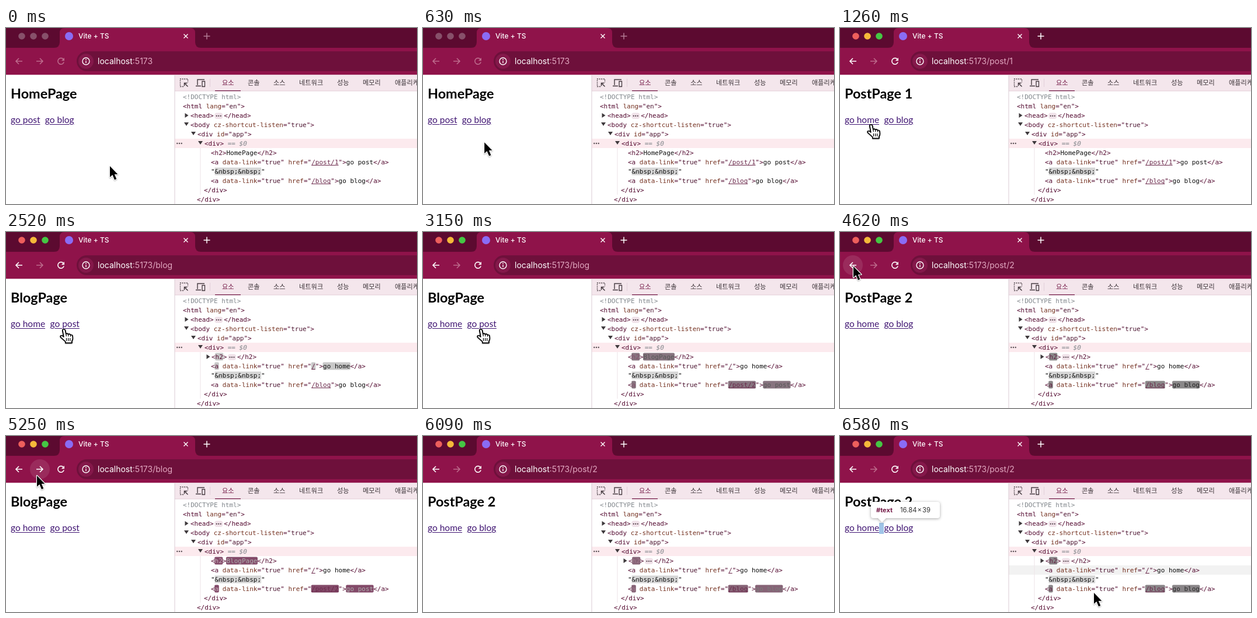
An HTML page with a canvas that plays this animation: 704x302 px, repeating every 6650 ms.

```html
<!DOCTYPE html>
<html lang="en">
<head>
<meta charset="utf-8">
<title>Router demo</title>
<style>
html, body { margin: 0; width: 100%; height: 100%; overflow: hidden; background: #fff; }
canvas { display: block; width: 704px; height: 302px; }
</style>
</head>
<body>
<canvas id="stage"></canvas>
<script>
const W = 704, H = 302, LOOP = 6650;
const canvas = document.getElementById('stage');
const ctx = canvas.getContext('2d');
const dpr = window.devicePixelRatio || 1;
canvas.width = W * dpr;
canvas.height = H * dpr;

const UI = 'Inter, Roboto, sans-serif';
const PAGE = 'Lato, "Open Sans", sans-serif';
const MONO = '"DejaVu Sans Mono", monospace';
const KOREAN = '"Noto Sans CJK KR", "Noto Sans CJK", sans-serif';

const STRIP = '#5c0a30', BAR = '#8f134a', PILL = '#6e103b', SOFT = '#e2a8c0', DIM = '#bd6b8c';
const TAG = [82, 8, 46], INK = [16, 16, 16], META = [138, 138, 138], WHITE = [255, 255, 255];
const FLASH = [126, 32, 84], LINK = [108, 42, 76], VALUE = [74, 18, 46];
const ATTR = '#74301f', GREY = '#80868b', ACCENT = '#741a47', VISITED = '#3f1472';
const rgb = (c, a = 1) => `rgba(${c.map(Math.round)},${a})`;
const mix = (a, b, k) => a.map((v, i) => v + (b[i] - v) * k);

const PAGES = {
  home: { title: 'HomePage', path: '', links: ['go post', 'go blog'] },
  post1: { title: 'PostPage 1', path: '/post/1', links: ['go home', 'go blog'] },
  blog: { title: 'BlogPage', path: '/blog', links: ['go home', 'go post'] },
  post2: { title: 'PostPage 2', path: '/post/2', links: ['go home', 'go blog'] }
};
const HREF = { 'go home': '/', 'go blog': '/blog' };

const visits = [[0, 'home'], [1190, 'post1'], [2520, 'blog'], [3570, 'post2'], [4970, 'blog'], [5670, 'post2']];
// Inspector updates follow each visit; the third item is the link that flashes.
const updates = [[-9999, 'home', -1], [1340, 'post1', 0], [2660, 'blog', 1],
  [3730, 'post2', 1], [5090, 'blog', 1], [5770, 'post2', 1]];
const path = [[0, 178, 236], [420, 178, 236], [800, 53, 166], [1890, 53, 166], [2400, 99, 167],
  [3500, 99, 167], [3780, 42, 68], [3990, 23, 58], [4990, 23, 58], [5200, 53, 67],
  [5950, 53, 67], [6300, 372, 192], [6580, 435, 268]];
const FOCUS = 840;

const latest = (list, t) => list.filter(e => e[0] <= t).pop();

function pointer(t) {
  const i = Math.max(1, path.findIndex(p => p[0] > t));
  if (t >= path[path.length - 1][0]) return path[path.length - 1].slice(1);
  const [a, b] = [path[i - 1], path[i]];
  const k = (t - a[0]) / (b[0] - a[0]);
  const e = k * k * (3 - 2 * k);
  return [a[1] + (b[1] - a[1]) * e, a[2] + (b[2] - a[2]) * e];
}

// cubic-bezier(0, 0, 0.2, 1)
function easeOut(x) {
  if (x <= 0) return 0;
  if (x >= 1) return 1;
  let lo = 0, hi = 1;
  for (let i = 0; i < 20; i++) {
    const m = (lo + hi) / 2;
    if (0.6 * m * m + 0.4 * m * m * m < x) lo = m; else hi = m;
  }
  return 3 * lo * lo - 2 * lo * lo * lo;
}

function rect(x, y, w, h, fill, r = 0) {
  ctx.fillStyle = fill;
  ctx.beginPath();
  ctx.roundRect(x, y, w, h, r);
  ctx.fill();
}

function disc(x, y, r, fill) {
  ctx.fillStyle = fill;
  ctx.beginPath();
  ctx.arc(x, y, r, 0, Math.PI * 2);
  ctx.fill();
}

function poly(points, fill) {
  ctx.fillStyle = fill;
  ctx.beginPath();
  points.forEach(p => ctx.lineTo(p[0], p[1]));
  ctx.closePath();
  ctx.fill();
}

function stroke(d, color, width = 1.5) {
  ctx.strokeStyle = color;
  ctx.lineWidth = width;
  ctx.stroke(new Path2D(d));
}

function text(s, x, y, font, color) {
  ctx.font = font;
  ctx.fillStyle = color;
  ctx.fillText(s, x, y);
  return x + ctx.measureText(s).width;
}

function drawBrowser(t, page, cursor) {
  const active = t >= FOCUS;
  const canForward = page.title === 'BlogPage' && t > 4000;
  rect(0, 0, W, 34, STRIP);
  rect(0, 34, W, 47, BAR);
  ctx.fillStyle = BAR;
  ctx.fill(new Path2D('M82 34Q92 34 92 24V8Q92 0 101 0H315Q324 0 324 8V24Q324 34 334 34Z'));
  ['#ed5f5c', '#f5b93a', '#45c744'].forEach((c, i) => disc(27 + i * 20, 14, 5.8, active ? c : '#87506a'));
  disc(108, 14, 7, '#8a6cf5');
  text('Vite + TS', 124, 18.3, '500 12px ' + UI, '#fff');
  stroke('M304.5 10.5l7 7m0-7l-7 7', '#fff', 1.4);
  stroke('M338.5 14h11m-5.5-5.5v11', active ? '#fff' : '#b47c95', 1.5);

  const [cx, cy] = cursor;
  if (cy < 74 && cy > 40) {
    if (cx < 39 && t > 3800 && t < 5200) disc(22, 57, 17, 'rgba(255,255,255,.1)');
    if (cx > 42 && t > 5000 && t < 5950) disc(58, 57, 17, 'rgba(255,255,255,.1)');
  }
  const live = active ? '#fff' : DIM;
  const canBack = page.title !== 'HomePage';
  stroke('M28 57H17m5-5l-5 5l5 5', canBack ? live : DIM, 1.6);
  stroke('M52 57H63m-5-5l5 5l-5 5', canForward ? live : DIM, 1.6);
  stroke('M98.6 54A5.3 5.3 0 1 0 99.2 58.6', live, 1.6);
  poly([[100, 51], [100, 56.2], [94.8, 56.2]], live);

  rect(121, 40, 620, 34, PILL, 17);
  disc(137, 57, 13, '#84184a');
  stroke('M143 57a6 6 0 1 1-12 0a6 6 0 1 1 12 0M137 56.2v4', '#fff', 1.4);
  disc(137, 54, 0.9, '#fff');
  const x = text('localhost', 157, 62, '14px ' + UI, '#fff');
  text(':5173' + page.path, x, 62, '14px ' + UI, SOFT);
}

function drawLink(s, x) {
  ctx.font = '15.5px ' + PAGE;
  const w = ctx.measureText(s).width;
  rect(x, 165, w, 1.1, VISITED);
  ctx.strokeStyle = '#fff';
  ctx.lineWidth = 2.4;
  ctx.strokeText(s, x, 163);
  text(s, x, 163, ctx.font, VISITED);
  return x + w;
}

function drawPage(page) {
  rect(0, 81, 289, 221, '#fff');
  rect(0, 80, W, 1, '#e3c3d1');
  text(page.title, 8, 121, 'bold 23.4px ' + PAGE, '#000');
  drawLink(page.links[1], drawLink(page.links[0], 8) + 8.4);
}

// Each token is [text, colour, mark, flash].
function code(x, y, tokens, age = 9999) {
  for (const [s, color, mark, flash] of tokens) {
    ctx.font = '11px ' + MONO;
    const w = ctx.measureText(s).width;
    let c = color;
    if (flash && age < 1400) {
      const bg = age < 1120
        ? rgb(mix(FLASH, META, easeOut(age / 1120)))
        : rgb(META, 1 - easeOut((age - 1120) / 280));
      rect(x - 0.5, y - 6.5, w + 1, 13, bg, 2);
      if (mark !== 'link') c = mix(WHITE, color, easeOut(age / 1400));
    }
    if (mark === 'entity') rect(x, y - 6.5, w, 13, '#d6d6d6');
    text(s, x, y + 3.8, (mark === 'italic' ? 'italic ' : '') + '11px ' + MONO, Array.isArray(c) ? rgb(c) : c);
    if (mark === 'link') rect(x, y + 5, w, 1, rgb(c));
    x += w;
  }
  return x;
}

const tag = s => [s, TAG];
const attr = (name, value) => [[' ' + name, ATTR], ['="', TAG], [value, VALUE], ['"', TAG]];

function caret(x, y, open) {
  poly(open ? [[x - 4, y - 4], [x + 4, y - 4], [x, y + 2]]
    : [[x - 2.5, y - 4], [x + 3.5, y], [x - 2.5, y + 4]], '#3f3a3d');
}

function dots(x, y, gap, r, color) {
  for (let i = -1; i < 2; i++) disc(x + i * gap, y, r, color);
}

function folded(x, y, name, flash, age) {
  const end = code(x, y, [tag('<'), [name, TAG, 'on', flash], tag('>')], age);
  rect(end + 1.5, y - 4.5, 14, 10.5, '#f0e2e9', 4);
  dots(end + 8.5, y + 0.8, 3.5, 1.1, '#4b3943');
  code(end + 17.5, y, [tag(`</${name}>`)]);
}

function anchor(y, label, flash, age) {
  code(351, y, [tag('<'), ['a', TAG, 'on', flash], ...attr('data-link', 'true'),
    [' href', ATTR], tag('="'), [HREF[label] || label.href, LINK, 'link', flash], tag('">'),
    [label.text || label, INK, 'on', flash], tag('</a>')], age);
}

function drawToolbar() {
  rect(289, 81, 415, 27, '#f4e6ec');
  rect(289, 107.5, 415, 1, '#e4cdd7');
  const icon = '#453b40';
  ctx.setLineDash([2, 1.6]);
  stroke('M304 100.5H298.5V87.5H311.5V93', icon, 1.3);
  ctx.setLineDash([]);
  stroke('M311.5 100.5l-6-6m0 5v-5h5', icon, 1.5);
  stroke('M328 98V88.5H340M325 99.5H334', icon, 1.4);
  stroke('M336 91.5h4.5v9h-4.5z', icon, 1.3);
  rect(349, 87, 1, 14, '#e3d0d9');
  const tabs = [['요소', 370], ['콘솔', 414], ['소스', 458], ['네트워크', 502],
    ['성능', 567], ['메모리', 611], ['애플리케이션', 666]];
  tabs.forEach(([s, x], i) => text(s, x, 98, '11.2px ' + KOREAN, i ? '#3d3439' : ACCENT));
  rect(358, 107, 44, 1.2, ACCENT);
}

function drawInspector(t) {
  const [since, name, changed] = latest(updates, t);
  const page = PAGES[name], age = t - since;
  rect(289, 81, 415, 221, '#fff');
  drawToolbar();
  rect(289, 190, 415, 16, '#fceaee');
  if (t >= 6440) rect(289, 222, 415, 16, '#f2f2f2');
  rect(288.5, 81, 1, 221, '#dccbd3');
  rect(332.5, 206, 1, 80, '#eee3e8');

  code(303, 118, [['<!DOCTYPE html>', GREY]]);
  code(303, 134, [tag('<html'), ...attr('lang', 'en'), tag('>')]);
  caret(309, 150, false);
  folded(316, 150, 'head');
  caret(309, 166, true);
  code(316, 166, [tag('<body'), ...attr('cz-shortcut-listen', 'true'), tag('>')]);
  caret(321, 182, true);
  code(328, 182, [tag('<div'), ...attr('id', 'app'), tag('>')]);
  dots(297, 198, 3.7, 1.2, '#5c5257');
  caret(333, 198, true);
  code(340, 198, [tag('<div>'), [' == $0', GREY, 'italic']]);

  const flash = changed >= 0;
  if (name.startsWith('post')) {
    caret(346, 214, false);
    folded(352, 214, 'h2', flash, age);
  } else {
    code(351, 214, [tag('<'), ['h2', TAG, 'on', flash], tag('>'),
      [page.title, INK, 'on', flash], tag('</h2>')], age);
  }
  const post = { text: 'go post', href: name === 'home' ? '/post/1' : '/post/2' };
  page.links.forEach((s, i) => anchor(230 + i * 32, s === 'go post' ? post : s, changed === i, age));
  code(351, 246, [['"', INK], ['&nbsp;&nbsp;', INK, 'entity'], ['"', INK]]);
  code(339, 278, [tag('</div>')]);
  code(327, 294, [tag('</div>')]);
}

function drawTooltip() {
  rect(67, 149, 8, 19, 'rgba(111,168,220,.66)');
  ctx.save();
  ctx.shadowColor = 'rgba(0,0,0,.35)';
  ctx.shadowBlur = 5 * dpr;
  ctx.shadowOffsetY = dpr;
  ctx.fillStyle = '#fff';
  ctx.fill(new Path2D('M57 113H167Q171 113 171 117V137Q171 141 167 141H79L72 148L65 141H57Q53 141 53 137V117Q53 113 57 113Z'));
  ctx.restore();
  text('#text', 62, 131, 'bold 11px ' + UI, ACCENT);
  text('16.84\u200a×\u200a39', 103, 131, '11.3px ' + UI, '#333');
}

const ARROW = new Path2D('M0 0V19L4.4 15L8 23.4L11.3 22L7.8 13.9H13.4Z');
const HAND = new Path2D('M-2.2 1Q0-1.5 2.2 1L3.8 8Q6.2 6.4 7.5 8.6Q10 7.2 11.4 9.6Q14.6 8.8 15 12Q16.2 17 13.8 20V23.4H2.8V21Q-1 17.5-5 14Q-6.6 11.6-4.6 10.8Q-2.4 10.2-.2 13Z');
const FINGERS = 'M3.8 8L4.4 12M7.5 8.6L8 12.2M11.4 9.6L11.7 12.6M4.5 15v5M7.7 15v5M10.8 15v5';

function drawCursor(t, [x, y]) {
  if (t >= 5950 && t < 6300) return;
  const hand = y > 150 && y < 169 && x < 126;
  ctx.save();
  ctx.translate(x, y + (hand ? 0 : 1));
  ctx.lineJoin = 'round';
  ctx.shadowColor = 'rgba(0,0,0,.3)';
  ctx.shadowBlur = 2 * dpr;
  ctx.shadowOffsetY = dpr;
  ctx.lineWidth = hand ? 1.6 : 2.4;
  ctx.strokeStyle = hand ? '#000' : '#fff';
  ctx.fillStyle = hand ? '#fff' : '#000';
  const shape = hand ? HAND : ARROW;
  ctx.stroke(shape);
  ctx.shadowColor = 'transparent';
  ctx.fill(shape);
  if (hand) {
    ctx.stroke(shape);
    stroke(FINGERS, '#000', 1.2);
  }
  ctx.restore();
}

function draw(t) {
  ctx.setTransform(dpr, 0, 0, dpr, 0, 0);
  const page = PAGES[latest(visits, t)[1]];
  const cursor = pointer(t);
  drawBrowser(t, page, cursor);
  drawPage(page);
  drawInspector(t);
  if (t >= 6510) drawTooltip();
  drawCursor(t, cursor);
}

const start = performance.now();
function tick() {
  draw((performance.now() - start) % LOOP);
  requestAnimationFrame(tick);
}
tick();
</script>
</body>
</html>
```
